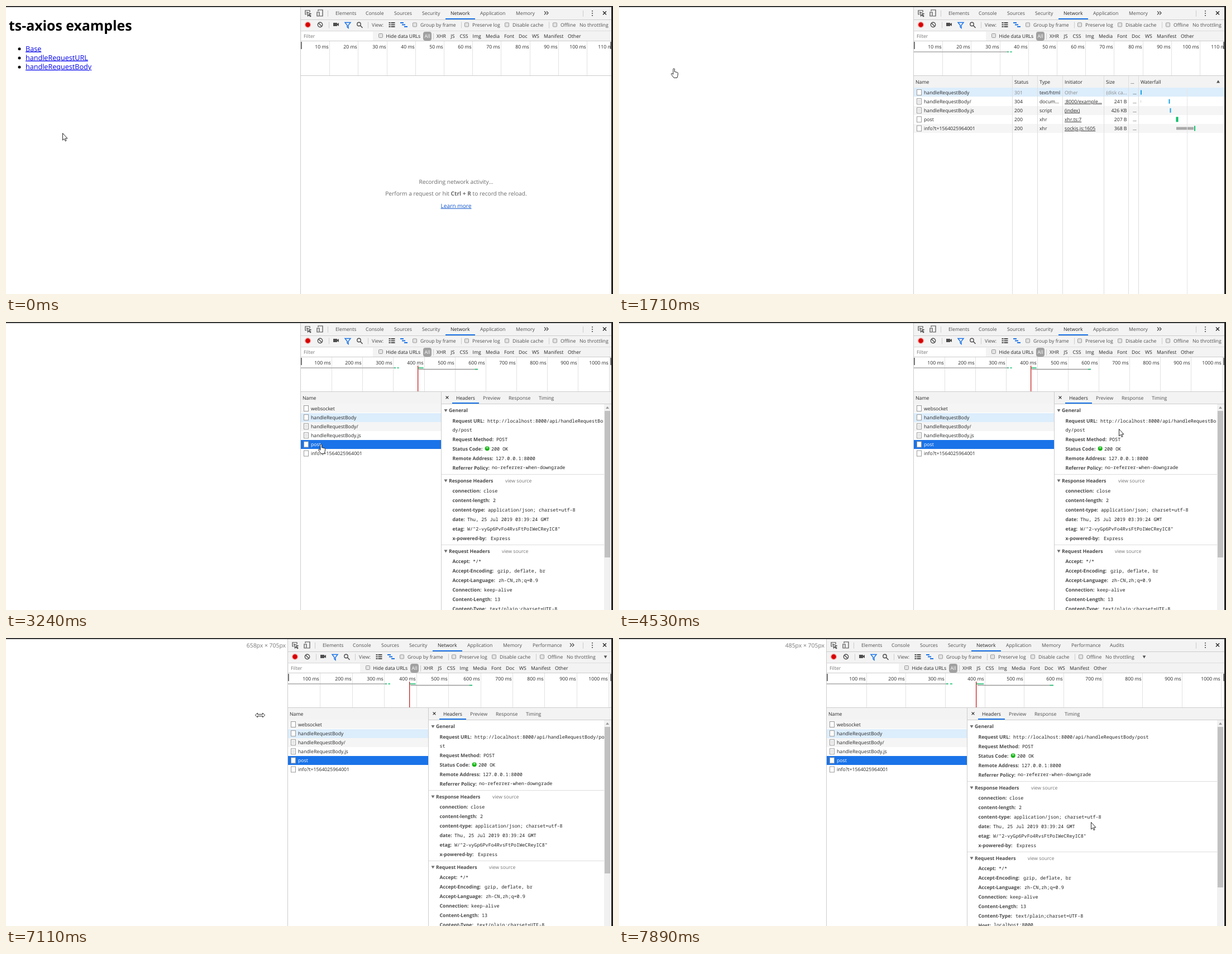
Animation of 1087 by 515 pixels, one loop 8000 ms. Source, as an HTML page:

```html
<!DOCTYPE html>
<html lang="en">
<head>
<meta charset="utf-8">
<title>Network panel</title>
<style>
html, body { margin: 0; width: 100%; height: 100%; overflow: hidden; background: #fff; }
svg { display: block; width: 100%; height: 100%; }
text { font-family: "Open Sans", "Noto Sans", sans-serif; text-rendering: geometricPrecision; white-space: pre; }
.mono { font-family: "Noto Sans Mono", "DejaVu Sans Mono", monospace; }
.bold { font-weight: 700; }
.link { text-decoration: underline; }
</style>
</head>
<body>
<svg id="stage" viewBox="0 0 1087 515"></svg>
<script>
const LOOP = 8000, RIGHT = 1084, UI = 8.7;
const INK = '#262626', SOFT = '#4e4e4e', DIM = '#888', BAR = '#f3f3f3', EDGE = '#ccc', BLUE = '#1a73e8', GREEN = '#0fbf6b';

const rect = (x, y, w, h, fill, extra = '') =>
  `<rect x="${x}" y="${y}" width="${w}" height="${h}" fill="${fill}" ${extra}/>`;
const path = (d, fill, stroke = 'none', width = 1, move = '') =>
  `<path d="${d}" fill="${fill}" stroke="${stroke}" stroke-width="${width}" ${move && `transform="translate(${move})"`}/>`;
const disc = (x, y, r, fill, extra = '') => `<circle cx="${x}" cy="${y}" r="${r}" fill="${fill}" ${extra}/>`;
const text = (x, y, s, { size = UI, fill = INK, cls = '', anchor = 'start' } = {}) =>
  `<text x="${x}" y="${y + size * .36}" font-size="${size}" fill="${fill}" class="${cls}" text-anchor="${anchor}">${s}</text>`;
const at = (steps, t) => steps.reduce((found, step) => step[0] <= t ? step : found);

const panelSteps = [[0, 528], [7110, 505], [7260, 455], [7390, 395], [7510, 372]];

const cursorSteps = [
  [0, 101, 227], [250, 99, 212], [380, 94, 180], [500, 91, 150], [630, 94, 125], [750, 93, 111, 'hand'],
  [1860, 114, 128], [2010, 152, 132], [2140, 193, 139], [2290, 300, 165], [2410, 440, 195], [2530, 549, 210],
  [2680, 553, 211, 'hand'], [2830, 559, 218, 'hand'], [3870, 630, 222], [3990, 700, 224], [4140, 771, 226],
  [4290, 830, 217], [4410, 870, 205], [4530, 895, 191], [4650, 910, 181], [4790, 918, 168], [4910, 925, 156],
  [5040, 927, 146], [5190, 927, 135], [5340, 927, 137], [5490, 926, 146], [5620, 926, 154], [5770, 961, 183],
  [5920, 975, 190], [6040, 860, 205], [6160, 710, 210], [6280, 570, 206], [6430, 546, 175], [6550, 532, 150],
  [6680, 528, 138, 'resize'], [7110, 455, 138, 'resize'], [7260, 395, 138, 'resize'], [7390, 374, 138, 'resize'],
  [7650, 520, 185], [7770, 720, 275], [7890, 845, 329]
];
const cursorShapes = {
  arrow: 'M.5 .5V13L3.3 10.4 5.2 14.6 7 13.8 5.2 9.8H9Z',
  hand: 'M4 1.6Q5.3-.4 6.6 1.6V6.6L11.2 7.6Q12.7 8 12.6 9.8L12.2 13.4 11 17.4H5.2L1.4 12.4Q-.4 9.6 1.8 9.4L4 11.2Z',
  resize: 'M-8.6 0L-4.6-4V-1.5H4.6V-4L8.6 0 4.6 4V1.5H-4.6V4Z'
};

const requests = [
  ['websocket', '(pendi...', 'websoc...', 'sockjs.js:1683', '0 B'],
  ['handleRequestBody', '301', 'text/html', 'Other', '(disk ca...'],
  ['handleRequestBody/', '304', 'docum...', ':8000/example...', '241 B'],
  ['handleRequestBody.js', '200', 'script', '(index)', '426 KB'],
  ['post', '200', 'xhr', 'xhr.ts:7', '207 B'],
  ['info?t=1564025964001', '200', 'xhr', 'sockjs.js:1605', '368 B']
];

// Each entry: label, offset of the value, value
const general = [
  ['Request Method', 98, 'POST'], ['Status Code', 89, '200 OK'],
  ['Remote Address', 97, '127.0.0.1:8000'], ['Referrer Policy', 90, 'no-referrer-when-downgrade']
];
const response = [
  ['connection', 75, 'close'], ['content-length', 92, '2'], ['content-type', 83, 'application/json; charset=utf-8'],
  ['date', 46, 'Thu, 25 Jul 2019 03:39:24 GMT'], ['etag', 46, 'W/"2-vyGp6PvFo4RvsFtPoIWeCReyIC8"'],
  ['x-powered-by', 88, 'Express']
];
const request = [
  ['Accept', 56, '*/*'], ['Accept-Encoding', 100, 'gzip, deflate, br'], ['Accept-Language', 102, 'zh-CN,zh;q=0.9'],
  ['Connection', 76, 'keep-alive'], ['Content-Length', 95, '13'], ['Content-Type', 86, 'text/plain;charset=UTF-8'],
  ['Host', 47, 'localhost:8000']
];
const requestUrl = 'http://localhost:8000/api/handleRequestBody/post';

function page(t) {
  if (t >= 1710) return '';
  const links = ['Base', 'handleRequestURL', 'handleRequestBody'];
  return text(5, 35.5, 'ts-axios examples', { size: 24.85, fill: '#000', cls: 'bold' }) +
    links.map((name, i) => {
      const y = 76 + i * 16.2, active = i === 2 && t >= 1170;
      return disc(24, y + .8, 2.5, '#000') +
        text(35, y, name, { size: 12.6, fill: active ? '#f00' : '#00e', cls: 'link' });
    }).join('');
}

const separator = (x, y) => rect(x, y - 5, 1, 11, EDGE);
const checkbox = (x, y) => rect(x - 3.5, y - 3.5, 7, 7, '#e4e4e4', 'rx="1" stroke="#999"');

function tabBar(x) {
  const tabs = [['Elements', 62], ['Console', 116], ['Sources', 167], ['Security', 217], ['Network', 268],
    ['Application', 321], ['Memory', 385]];
  if (x <= 515) tabs.push(['Performance', 438]);
  if (x <= 480) tabs.push(['Audits', 507]);
  const more = x > 515 ? 439 : x > 480 ? 508 : 0;
  return rect(x, 2, RIGHT - x, 22, BAR) + rect(x, 24, RIGHT - x, 1, EDGE) +
    path('M3 8H1V1H9V4M4 4L11 7 8 8 11 11 10 12 7 9 5.5 11Z', 'none', SOFT, 1.2, `${x + 7} 7`) +
    path('M3 3V1H11V12H6M1 5H5V12H1Z', 'none', SOFT, 1.2, `${x + 28} 6`) +
    separator(x + 48, 13) +
    tabs.map(([name, dx]) => text(x + dx, 13, name, { fill: name === 'Network' ? '#222' : SOFT })).join('') +
    rect(x + 259, 22, 53, 2, BLUE) +
    (more ? path('M0-3L3 0 0 3M4-3L7 0 4 3', 'none', SOFT, 1.3, `${x + more - 3} 12.5`) : '') +
    separator(1033, 13) +
    [9, 13, 17].map(y => disc(1050, y, 1.1, SOFT)).join('') +
    path('M-3-3L3 3M3-3L-3 3', 'none', INK, 1.4, '1072 12.5');
}

function toolBar(x) {
  const y = 33.5;
  const boxes = [['Group by frame', 204], ['Preserve log', 297], ['Disable cache', 369], ['Offline', 455]];
  return rect(x, 25, RIGHT - x, 19, BAR) + rect(x, 44, RIGHT - x, 1, '#ddd') +
    disc(x + 12.5, y, 5, '#d80000', 'stroke="#f3b5b5" stroke-width="1.5"') +
    disc(x + 34.5, y, 4.2, 'none', `stroke="${SOFT}" stroke-width="1.4"`) +
    path('M-3-3L3 3', 'none', SOFT, 1.4, `${x + 34.5} ${y}`) +
    separator(x + 50, y) + separator(x + 120, y) + separator(x + 287, y) + separator(x + 444, y) +
    path('M0 0H7V2L10 0V6L7 4V6H0Z', SOFT, 'none', 1, `${x + 58} 30`) +
    path('M0 0H10L6 5V10L4 8V5Z', 'none', BLUE, 1.4, `${x + 79} 29.5`) +
    disc(x + 104, 32.5, 3.2, 'none', `stroke="${SOFT}" stroke-width="1.4"`) +
    path('M0 0L4 4', 'none', SOFT, 1.6, `${x + 106.5} 35`) +
    text(x + 127, y, 'View:', { fill: SOFT }) +
    path('M0 1H3M4 1H11M0 4.5H3M4 4.5H11M0 8H3M4 8H11', 'none', SOFT, 2, `${x + 157.5} 29`) +
    path('M0 1H6M3 4.5H9M7 8H13', 'none', BLUE, 2, `${x + 178} 29`) +
    boxes.map(([name, dx]) => checkbox(x + dx, y) + text(x + dx + 10, y, name, { fill: SOFT })).join('') +
    text(x + 499, y, 'No throttling', { fill: SOFT }) +
    path('M-2.8-2H2.8L0 3Z', SOFT, 'none', 1, `${x + 568.5} ${y}`);
}

function filterBar(x) {
  const y = 54;
  const types = [['XHR', 243], ['JS', 268.5], ['CSS', 284.5], ['Img', 307.5], ['Media', 331], ['Font', 364],
    ['Doc', 390], ['WS', 414], ['Manifest', 435], ['Other', 478]];
  return rect(x, 45, RIGHT - x, 18, BAR) + rect(x + 1, 46, 128, 16, '#fff') + rect(x, 62, RIGHT - x, 1, EDGE) +
    text(x + 5, y, 'Filter', { fill: '#757575' }) +
    checkbox(x + 143, 53) + text(x + 152.5, 53.5, 'Hide data URLs') +
    rect(x + 219, 46, 15, 16, '#a0a0a0', 'rx="4"') + text(x + 226.5, y, 'All', { fill: '#fff', anchor: 'middle' }) +
    separator(x + 237, y) +
    types.map(([name, dx]) => text(x + dx, y, name)).join('');
}

function overview(x, t) {
  const width = RIGHT - x;
  const [, pitch, unit] = at([[0, .0921, 10], [1860, .1548, 100], [2290, .0992, 100]], t);
  const span = (from, to, y, fill) => rect(x + from * width, y, (to - from) * width, 1.5, fill);
  let out = rect(x, 63, width, 62, '#fff');
  for (let i = 1; i * pitch < 1.05; i++) {
    const gx = x + Math.round(i * pitch * width);
    out += rect(gx, 63, 1, 62, '#e2e2e2') + text(gx - 1.3, 73, i * unit + ' ms', { anchor: 'end' });
  }
  if (t >= 1450) out += span(0, .304, 81.3, '#aaa') + span(.301, .306, 81.3, GREEN) + span(.31, .316, 81.3, GREEN);
  if (t >= 1860) out += span(.376, .395, 81.3, GREEN) + span(.379, .57, 83.8, '#999') + span(.561, .57, 83.8, GREEN);
  if (t >= 2010) out += rect(Math.round(x + .375 * width), 78, 1.3, 47, '#c5221f');
  return out + rect(x, 64, 2, 13, '#777') + rect(RIGHT - 2, 64, 2, 13, '#777') + rect(x, 124, width, 1, EDGE);
}

function emptyHint(x) {
  const line = (y, s, extra) => text(x + 278, y, s, { size: 10.2, fill: '#6a6a6a', anchor: 'middle', ...extra });
  return line(314, 'Recording network activity…') +
    line(335.5, 'Perform a request or hit <tspan class="bold">Ctrl + R</tspan> to record the reload.') +
    line(357, 'Learn more', { fill: '#1155cc', cls: 'link' });
}

function fileIcon(x, y, lined) {
  return rect(x + .5, y - 5, 8, 10, '#fff', 'stroke="#999"') +
    (lined ? path('M2-2H7M2 0H7M2 2H7', 'none', '#bbb', .7, `${x} ${y}`) : '');
}

function rowList(t) {
  if (t >= 1860) return requests;
  return requests.slice(1, t >= 1590 ? 6 : t >= 1450 ? 4 : 2);
}

function table(x, t, detailed) {
  const width = detailed ? 251 : RIGHT - x;
  let out = rect(x, 125, width, 21, BAR) + rect(x, 146, width, 1, EDGE) + text(x + 3, 136, 'Name');
  rowList(t).forEach(([name, status, type, initiator, size], i) => {
    const y = 154.5 + i * 16.1, top = Math.round(146.4 + i * 16.1);
    const chosen = detailed && name === 'post', hinted = name === 'handleRequestBody';
    const fill = chosen ? BLUE : hinted ? '#dcedfc' : i % 2 ? '#fff' : '#f5f5f5';
    const faint = hinted ? DIM : INK;
    out += rect(x, top, width, 16, fill) + fileIcon(x + 5, y, /[/]$|js$/.test(name)) +
      text(x + 18, y, name, { fill: chosen ? '#fff' : INK });
    if (detailed) return;
    out += text(x + 180, y, status, { fill: name === 'websocket' ? DIM : faint }) + text(x + 225, y, type) +
      text(x + 270, y, initiator, { fill: faint, cls: hinted ? '' : 'link' }) +
      text(x + 381.5, y, size, { fill: faint, anchor: 'end' }) + text(x + 392, y, '...') +
      waterfall(x, y, name);
  });
  if (detailed) return out;
  const heads = [['Status', 180], ['Type', 225], ['Initiator', 270], ['Size', 344], ['...', 388], ['Waterfall', 406]];
  out += heads.map(([name, dx]) => text(x + dx, 136, name)).join('') + path('M-3 2H3L0-3Z', SOFT, 'none', 1, '1073 135.5');
  out += [176, 221, 266, 340, 384, 402].map(dx => rect(x + dx, 125, 1, 390, '#ddd')).join('');
  out += rect(x + 489, 147, 1, 368, '#e6e6e6');
  if (t >= 2010) out += rect(x + 469, 146, 1.4, 369, '#4a5788');
  return out;
}

function waterfall(x, y, name) {
  const tick = (dx, w, h, fill) => rect(x + dx, y - h / 2, w, h, fill);
  switch (name) {
    case 'handleRequestBody': return tick(406, 2, 8, '#14a0e8');
    case 'handleRequestBody/': return tick(406, 1, 4, '#ccc') + tick(456.5, 2, 8, '#14a0e8');
    case 'handleRequestBody.js': return tick(458.5, 2, 8, '#14a0e8');
    case 'post': return tick(469.5, 4, 9, GREEN);
    case 'info?t=1564025964001': return tick(470, 31, 5, '#aaa') + tick(502, 2, 9, GREEN);
  }
  return '';
}

function details(x, t) {
  const d = x + 252, tabs = [['Headers', 26], ['Preview', 74], ['Response', 120], ['Timing', 174]];
  const hovered = t >= 5190 && t < 5620 ? 'Response' : 'Headers';
  const value = (dx, y, s) => text(d + dx, y, s, { size: 8.44, cls: 'mono', fill: '#222' });
  const label = (y, s) => text(d + 19.5, y, s + ':', { fill: '#4a4a4a', cls: 'bold' });
  const entries = (list, y) => list.map(([name, dx, s], i) => {
    const ly = y + i * 16.9;
    return label(ly, name) + value(dx, ly, s) +
      (name === 'Status Code' ? disc(d + 81.7, ly - .3, 4, '#17b317') + disc(d + 81.7, ly - 1.8, 2, '#7be07b') : '');
  }).join('');
  const heading = (y, s, link) => path('M0-2H6L3 3Z', '#6e6e6e', 'none', 1, `${d + 4.5} ${y}`) +
    text(d + 13, y, s, { fill: '#4a4a4a', cls: 'bold' }) +
    (link ? text(d + link, y, 'view source', { fill: '#757575' }) + rect(d, Math.round(y - 11.5), 1071 - d, 1, '#ddd') : '');

  const fit = Math.floor((1072.5 - d - 82) / 5.07), rest = requestUrl.slice(fit), shift = rest ? 16 : 0;
  return rect(d, 125, RIGHT - d, 390, '#fff') + rect(d, 125, RIGHT - d, 21, BAR) + rect(d, 146, RIGHT - d, 1, EDGE) +
    rect(d - 1, 125, 1, 390, EDGE) +
    path('M-2.4-2.4L2.4 2.4M2.4-2.4L-2.4 2.4', 'none', INK, 1.1, `${d + 10} 135`) +
    tabs.map(([name, dx]) => text(d + dx, 136, name, { fill: name === 'Headers' || name === hovered ? '#222' : SOFT })).join('') +
    rect(d + 19, 144, 48, 2, BLUE) +
    heading(158, 'General') + label(177, 'Request URL') + value(82, 177, requestUrl.slice(0, fit)) +
    (rest ? value(19.5, 193, rest) : '') +
    entries(general, 193.7 + shift) +
    heading(267.5 + shift, 'Response Headers', 114) + entries(response, 286 + shift) +
    heading(393.5 + shift, 'Request Headers', 108) + entries(request, 412 + shift) +
    rect(1071, 147, 13, 368, '#f1f1f1') + path('M-3 2H3L0-2Z', '#999', 'none', 1, '1077 153') +
    rect(1072, 159, 10, rest ? 262 : 287, '#c1c1c1');
}

function pointer(t) {
  const [, x, y, kind = 'arrow'] = at(cursorSteps, t);
  return path(cursorShapes[kind], '#fff', '#111', .9, `${x} ${y}`);
}

function scene(t) {
  const x = at(panelSteps, t)[1], detailed = t >= 3240;
  const sizeNote = t >= 7110
    ? text(x - 4, 13, `${Math.round(485 + 1.3 * (x - 372))}px × 705px`, { size: 10.4, fill: '#777', anchor: 'end' }) : '';
  return rect(0, 0, 1087, 515, '#fff') + page(t) + sizeNote +
    rect(x, 2, RIGHT - x, 513, '#fff') + tabBar(x) + toolBar(x) + filterBar(x) + overview(x, t) +
    (t < 1300 ? emptyHint(x) : table(x, t, detailed)) + (detailed ? details(x, t) : '') +
    rect(x - 1, 2, 1, 513, EDGE) +
    rect(0, 0, 1087, 2, '#333') + rect(RIGHT, 0, 3, 515, '#222') + pointer(t);
}

const stage = document.getElementById('stage');
const start = performance.now();
let shown = '';
function play() {
  const next = scene((performance.now() - start) % LOOP);
  if (next !== shown) stage.innerHTML = shown = next;
  requestAnimationFrame(play);
}
play();
</script>
</body>
</html>
```
